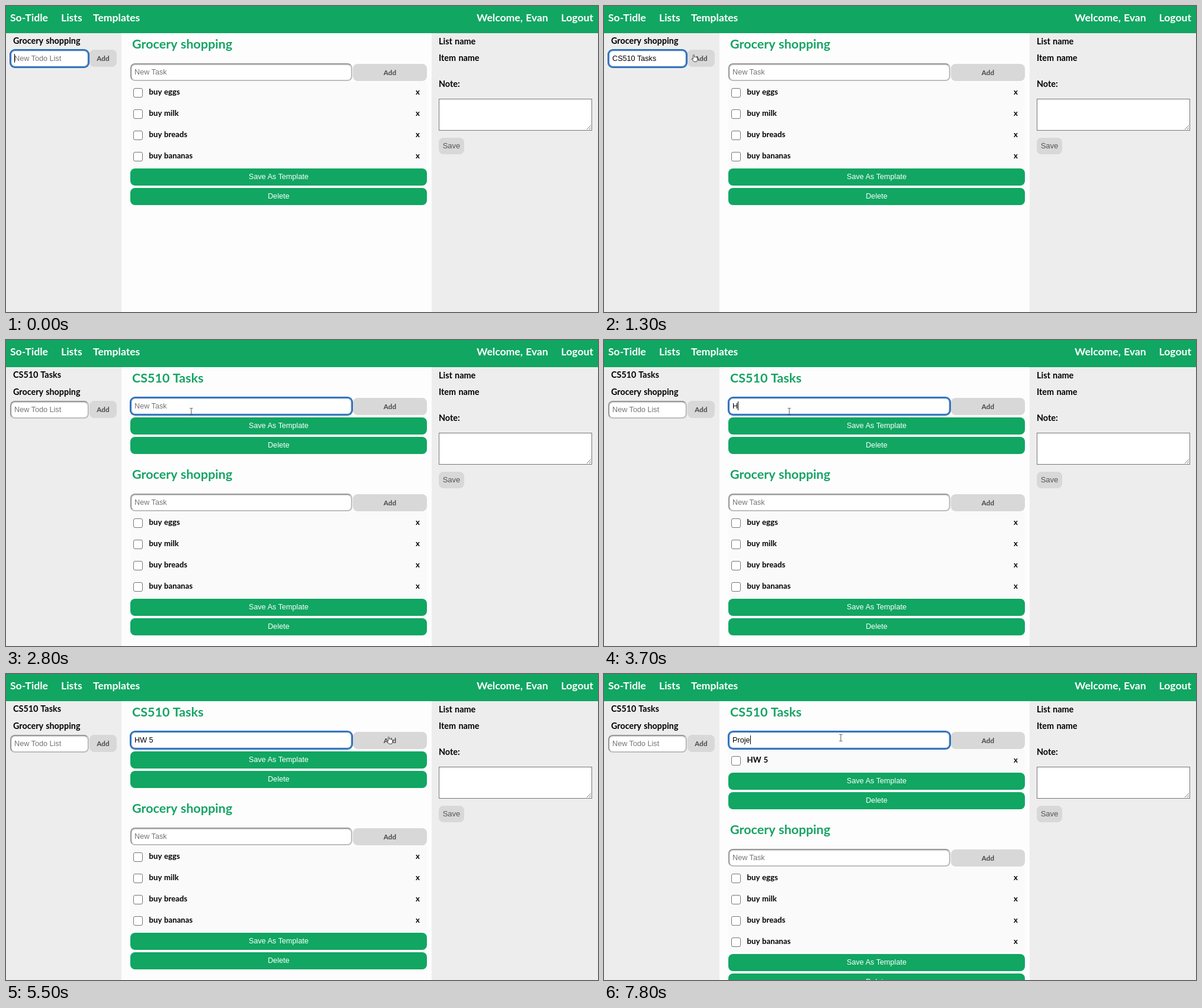
Animation of 1000x518 px, one loop 8000 ms. Source, as an HTML page:

```html
<!DOCTYPE html>
<html lang="en">
<head>
<meta charset="utf-8">
<title>Todo lists</title>
<style>
html, body { margin: 0; width: 1000px; height: 518px; overflow: hidden; background: #fdfdfd; }
body { position: relative; font: bold 14.4px Lato, sans-serif; word-spacing: .8px; color: #000; white-space: pre; }
header, aside, main, .at, #pointer { position: absolute; }
header { left: 0; top: 0; z-index: 1; width: 1000px; height: 46px; background: #11a662; color: #fff; font-size: 17.6px; line-height: 39px; }
header .at { top: 0; }
aside { top: 45px; height: 473px; background: #ededed; line-height: 28.5px; }
#side { left: 0; width: 195px; }
#side p { margin: 0 0 0 12px; height: 28.5px; }
#note { left: 719px; width: 281px; }
main { left: 210px; top: 45px; width: 501px; }
h2 { margin: 0; padding-left: 3px; height: 52px; font-size: 21.5px; line-height: 39.5px; color: #16a364; }
.form { position: relative; height: 31px; }
.field, .btn, .save { font: 12.65px/26px "Liberation Sans", Arial, sans-serif; word-spacing: 0; }
.field { position: absolute; box-sizing: border-box; height: 30px; padding-left: 5px; border: 2px solid; border-color: #979797 #bdbdbd #bdbdbd #979797;
  border-radius: 8px; background: #fff; box-shadow: inset 0 1px 2px #ccc; }
.field.on { border-color: #3f7cc0; box-shadow: 0 0 0 1px #1d62b5, inset 0 0 2px #8fb4dc; }
.hint { color: #757575; }
.field i { position: absolute; width: 1px; height: 15px; top: 5px; background: #000; }
.add { position: absolute; height: 29px; border-radius: 8px; background: #d8d8d8; color: #484848; font-size: 11.7px; line-height: 29px; text-align: center; }
.row { position: relative; height: 36px; padding-left: 31.5px; background: #fafafa; font-size: 13.2px; line-height: 35px; }
.row b { position: absolute; left: 482px; }
.row u { position: absolute; left: 5px; top: 11px; box-sizing: border-box; width: 16px; height: 16px; border: 1px solid #767676; border-radius: 3px; background: #fff; }
.btn { height: 29px; margin-top: 3px; border-radius: 8px; background: #11a662; color: #fff; line-height: 29px; text-align: center; }
.btn + .btn { margin: 4px 0 15px; }
.area { left: 12px; top: 112px; box-sizing: border-box; width: 259px; height: 54px; border: 1px solid #767676; background: #fff; }
.area svg { position: absolute; right: 1px; bottom: 1px; }
.save { left: 12px; top: 178px; width: 43px; height: 28px; border-radius: 8px; background: #d8d8d8; color: #555; font-size: 13px; line-height: 28px; text-align: center; }
#pointer { left: -8px; top: -8px; }
</style>
</head>
<body>
<header>
<span class="at" style="left:7px">So-Tidle</span><span class="at" style="left:93px">Lists</span><span class="at" style="left:147px">Templates</span>
<span class="at" style="left:795px">Welcome, Evan</span><span class="at" style="right:8px">Logout</span>
</header>
<aside id="side"></aside>
<main></main>
<aside id="note">
<span class="at" style="left:12px;top:.5px">List name</span><span class="at" style="left:12px;top:29px">Item name</span><span class="at" style="left:12px;top:73px">Note:</span>
<div class="at area"><svg width="7" height="7" stroke="#777"><path d="M0 7 7 0M4 7 7 4"/></svg></div>
<div class="at save">Save</div>
</aside>
<svg id="pointer" width="16" height="16"><path/></svg>
<script>
const LOOP = 8000, ADD_LIST = 1800, ADD_TASK = 5700;
const GROCERIES = ['buy eggs', 'buy milk', 'buy breads', 'buy bananas'];
// [time, focused field, its text]
const TYPING = [
  [0, 'side', ''], [200, 'side', 'C'], [300, 'side', 'CS'], [400, 'side', 'CS510'],
  [700, 'side', 'CS510 Ta'], [800, 'side', 'CS510 Tasks'], [ADD_LIST, '', ''],
  [2300, 'main', ''], [3700, 'main', 'H'], [4000, 'main', 'HW'], [4100, 'main', 'HW '],
  [4800, 'main', 'HW 5'], [ADD_TASK, '', ''], [6100, 'main', ''], [6800, 'main', 'P'],
  [7000, 'main', 'Pr'], [7600, 'main', 'Pro'], [7700, 'main', 'Proj'], [7800, 'main', 'Proje']
];
// [time, x, y]
const MOVES = [
  [800, 101, 140], [1200, 153, 88], [1900, 153, 88], [2100, 313, 121], [4800, 313, 121],
  [5000, 545, 97], [5200, 648, 112], [5700, 648, 112], [6000, 400, 108], [LOOP, 400, 108]
];
const SHAPES = {
  arrow: ['M6 3v9l2-2 2 3 1-1-1.500-2.500h2.500z', '#222', '#fff', .5],
  beam: ['M5.500 2.500h2l.5.500.5-.5h2M8 3v10M5.500 13.500h2l.5-.5.500.5h2', 'none', '#555', 1],
  hand: ['M5.500 9V3q1-1.500 2 0v3.500q1-.8 2 .2 1-.6 2 .4 1.500-.4 1.500 1v3l-1.500 3.200h-4.500L3 9.500q0-1.500 2.500.5z', '#fff', '#444', 1]
};
const $ = s => document.querySelector(s);
const pointer = $('#pointer'), shape = $('#pointer path');

function field(hint, width, focused, text, caret, pos = 'left:0') {
  const body = text || `<span class="hint">${hint}</span>`;
  const mark = focused && caret ? '<i></i>' : '';
  return `<div class="field${focused ? ' on' : ''}" style="${pos};width:${width}px">${text ? body + mark : mark + body}</div>`;
}

const list = (title, tasks, focused, text, caret) =>
  `<h2>${title}</h2><div class="form">${field('New Task', 375, focused, text, caret)}` +
  '<div class="add" style="left:376px;top:.5px;width:125px">Add</div></div>' +
  tasks.map(task => `<div class="row"><u></u>${task}<b>x</b></div>`).join('') +
  '<div class="btn">Save As Template</div><div class="btn">Delete</div>';

function drawPage(t) {
  const [start, focus, text] = TYPING.findLast(k => k[0] <= t);
  const caret = Math.floor((t - start) / 500) % 2 === 0;
  const added = t >= ADD_LIST, inSide = focus === 'side', inMain = focus === 'main';
  const names = added ? ['CS510 Tasks', 'Grocery shopping'] : ['Grocery shopping'];
  const top = names.length * 28.5 + .5;
  $('#side').innerHTML = names.map(n => `<p>${n}</p>`).join('') +
    field('New Todo List', 133, inSide, inSide ? text : '', caret, `left:7px;top:${top}px`) +
    `<div class="add" style="left:141px;top:${top}px;width:46px">Add</div>`;
  $('main').innerHTML =
    (added ? list(names[0], t >= ADD_TASK ? ['HW 5'] : [], inMain, inMain ? text : '', caret) : '') +
    list('Grocery shopping', GROCERIES, false, '', false);
}

function drawPointer(t) {
  pointer.style.display = t < MOVES[0][0] ? 'none' : '';
  if (t < MOVES[0][0]) return;
  const i = MOVES.findLastIndex(k => k[0] <= t);
  const [t0, x0, y0] = MOVES[i], [t1, x1, y1] = MOVES[i + 1];
  const p = (t - t0) / (t1 - t0), x = x0 + (x1 - x0) * p, y = y0 + (y1 - y0) * p;
  const kind = x > 586 || (x > 141 && x < 187 && y < 104) ? 'hand' : x > 210 && y > 98 ? 'beam' : 'arrow';
  const [d, fill, stroke, width] = SHAPES[kind];
  for (const [name, value] of Object.entries({ d, fill, stroke, 'stroke-width': width })) shape.setAttribute(name, value);
  pointer.style.transform = `translate(${x}px,${y}px)`;
}

let last = -1;
function tick() {
  const t = Math.floor(performance.now() % LOOP / 100) * 100;
  if (t !== last) {
    drawPage(t);
    drawPointer(t);
    last = t;
  }
  requestAnimationFrame(tick);
}
tick();
</script>
</body>
</html>
```
